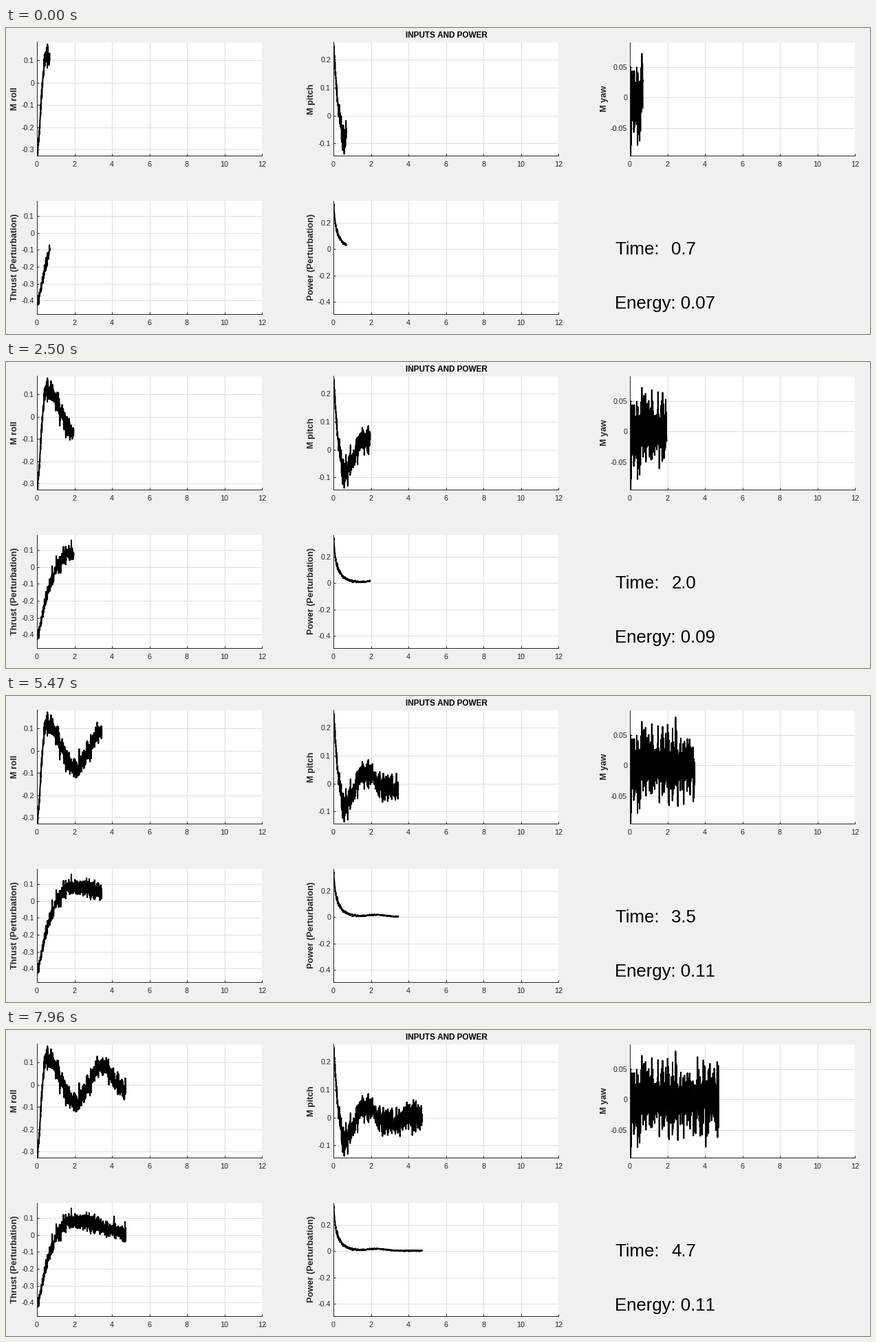
A matplotlib script that plays this animation: 1256x446 px, repeating every 8000 ms.

```python
import matplotlib.pyplot as plt
import numpy as np
from matplotlib.animation import FuncAnimation

W, H, DPI = 1256, 446, 100
FRAMES, INTERVAL = 125, 64
T_START, T_STEP = 0.685, 0.03262
DT = 0.007
PX = 72 / DPI
INK = "#262626"

plt.rcParams["font.family"] = "Liberation Sans"
plt.rcParams["text.kerning_factor"] = 6
plt.rcParams["path.simplify"] = False

fig = plt.figure(figsize=(W / DPI, H / DPI), dpi=DPI, facecolor="#f0f0f0")
rng = np.random.default_rng(8)
time = np.arange(0, 5, DT)


def text(x, y, s, size, **kw):
    """Text placed in pixels, measured from the top left corner."""
    return fig.text(x / W, 1 - y / H, s, fontsize=size * PX, **kw)


def panel(col, row, name, ylim, first, step):
    """Axes at a grid cell, with y ticks at every step from the first."""
    left, bottom, height = 45 + 431 * col, 186 + 231 * row, 165.5
    ax = fig.add_axes([left / W, 1 - bottom / H, 327 / W, height / H])
    ticks = np.round(np.arange(first, ylim[1], step), 2) + 0.0
    ax.set(xlim=(0, 12), ylim=ylim)
    ax.set_xticks(range(0, 13, 2))
    ax.set_yticks(ticks, [f"{v:g}" for v in ticks])
    ax.set_axisbelow(True)
    ax.grid(color="#dedede", lw=PX)
    ax.tick_params(direction="in", length=3 * PX, width=PX, color=INK,
                   labelcolor=INK, labelsize=10.7 * PX)
    ax.tick_params(axis="x", pad=8 * PX)
    ax.tick_params(axis="y", pad=4 * PX)
    for side, spine in ax.spines.items():
        spine.set(visible=side in ("left", "bottom"), color=INK, lw=PX)
    text(left - 28.5 if col == 0 else left - 29 if row else left - 29 - 3 * col + 3,
         bottom - height / 2, name, 12.7, weight="bold", color=INK,
         rotation=90, rotation_mode="anchor", ha="center", va="baseline") \
        if col < 2 else \
        text(left - 34.5, bottom - height / 2, name, 12.7, weight="bold",
             color=INK, rotation=90, rotation_mode="anchor", ha="center",
             va="baseline")
    return ax.plot([], [], color="black", lw=2 * PX)[0]


def decay(tau, power=1.0):
    return np.exp(-(time / tau) ** power)


def bump(center, width):
    return np.exp(-((time - center) / width) ** 2)


def swing(peak, period):
    return np.cos(2 * np.pi * (time - peak) / period)


def noise(sigma):
    return sigma * rng.normal(size=time.size)


settle = np.clip(time / 0.5, 0.5, 1)
power_trend = (0.18 * decay(0.08) + 0.19 * decay(0.37)
               + 0.015 * bump(2.3, 0.7) + 0.002)

roll = (0.01 + 0.12 * decay(6.7) * swing(0.6, 2.95) - 0.375 * decay(0.257, 2)
        + noise(0.024) * settle)
pitch = (-0.118 * decay(1.8) * swing(0.6, 2.5) + 0.27 * decay(0.25, 1.3)
         + noise(0.024) * settle)
yaw = noise(0.027) - 0.12 * bump(0.04, 0.015)
thrust = (0.2 * decay(3.1, 2) - 0.01 - 0.62 * decay(0.85, 1.2)
          + noise(0.024) * settle)
power = power_trend + noise(0.002 + 0.011 * decay(0.5))

# Energy is the running integral of the power trend.
energy = np.append(0, np.cumsum((power_trend[1:] + power_trend[:-1]) / 2) * DT)

traces = [
    (panel(0, 0, "M roll", (-.327, .183), -.3, .1), roll),
    (panel(1, 0, "M pitch", (-.1443, .264), -.1, .1), pitch),
    (panel(2, 0, "M yaw", (-.096, .092), -.05, .05), yaw),
    (panel(0, 1, "Thrust (Perturbation)", (-.479, .191), -.4, .1), thrust),
    (panel(1, 1, "Power (Perturbation)", (-.494, .3686), -.4, .2), power),
]

text(640, 14.3, "INPUTS AND POWER", 11.8, weight="bold", ha="center")
text(885, 329.7, "Time:", 25.7)
clock = text(967.4, 329.7, "", 25.7)
meter = text(885, 408.7, "", 25.7)


def draw(i):
    now = T_START + T_STEP * i
    shown = time < now
    xs = np.append(time[shown], now)
    for line, ys in traces:
        line.set_data(xs, np.append(ys[shown], np.interp(now, time, ys)))
    clock.set_text(f"{now:.1f}")
    used = np.interp(now, time, energy)
    meter.set_text(f"Energy: {np.floor(100 * used) / 100:.2f}")
    return [line for line, _ in traces] + [clock, meter]


anim = FuncAnimation(fig, draw, frames=FRAMES, interval=INTERVAL,
                     repeat=True, repeat_delay=0, blit=False)
plt.show()
```
